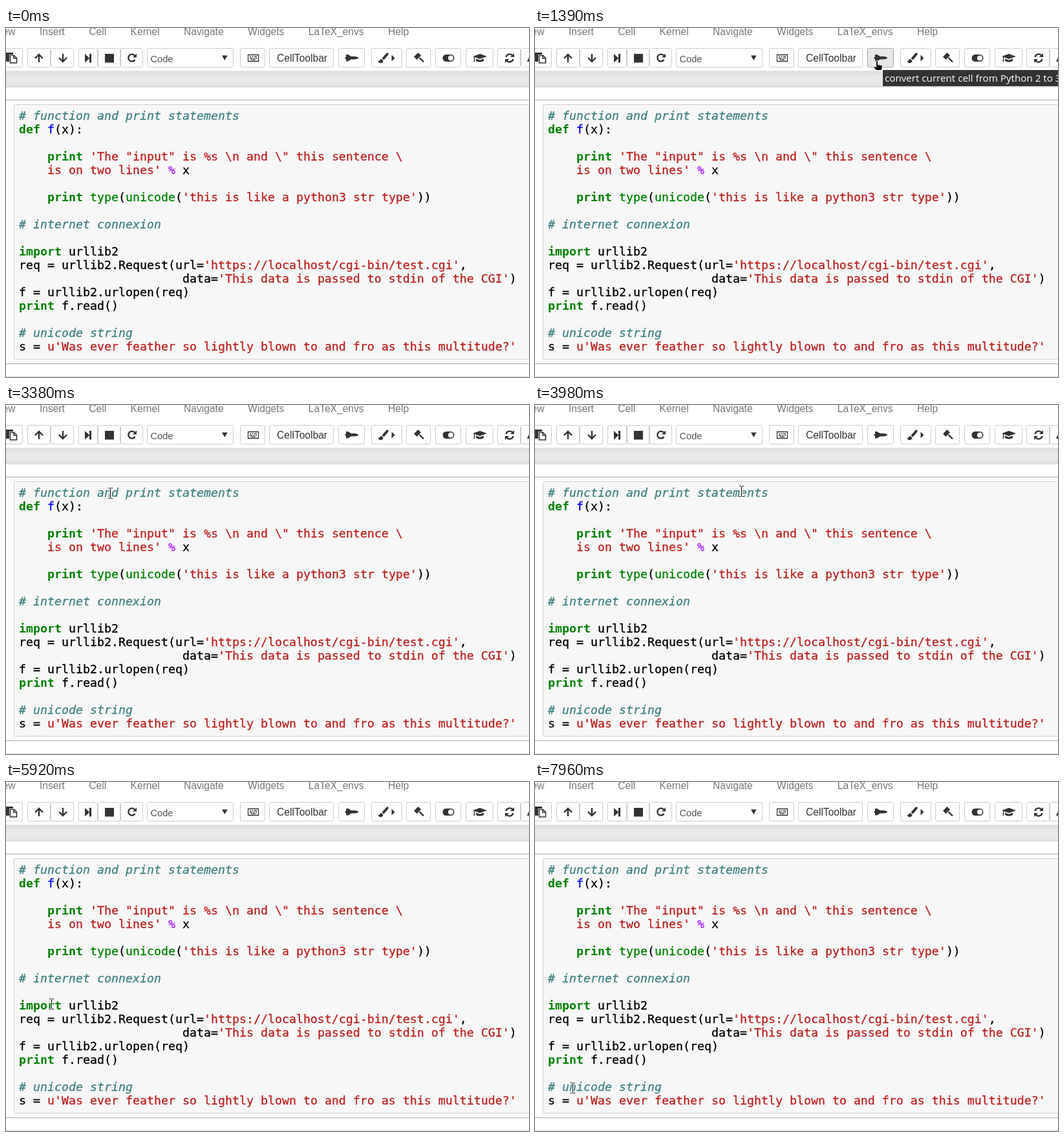
An HTML page that plays this animation: 809 by 540 pixels, repeating every 8 s.

```html
<!DOCTYPE html>
<html lang="en">
<head>
<meta charset="utf-8">
<title>Notebook toolbar</title>
<style>
html, body { margin: 0; width: 100%; height: 100%; overflow: hidden; background: #eee; }
#stage { position: relative; width: 809px; height: 540px; overflow: hidden; background: #eee; }
#stage > * { position: absolute; box-sizing: border-box; }
#page, #header { left: -30px; width: 900px; background: #fff; box-shadow: 0 0 14px 1px rgba(87,87,87,.2); }
#page { top: 92px; height: 500px; }
#header { top: -40px; height: 107px; border-bottom: 1px solid #e7e7e7; }
#cell { left: -9px; top: 111px; width: 900px; height: 409px; border: 1px solid #ababab; }
#rule { left: 0; top: 539px; width: 809px; height: 1px; background: #ddd; }
#code { left: 12px; top: 118px; width: 860px; height: 395px; margin: 0; padding: 6px 7px; border: 1px solid #cfcfcf;
  border-radius: 2px; background: #f7f7f7; color: #000; font: 18.27px/21px "DejaVu Sans Mono", monospace;
  -webkit-text-stroke: .3px; }
#code i { color: #408080; }
#code b { color: #008000; -webkit-text-stroke: 0; }
#code s { color: #ba2121; text-decoration: none; }
#code u { color: #008000; text-decoration: none; }
#code em { color: #00f; font-style: normal; }
#code q { color: #a2f; quotes: none; }
svg { left: 0; top: 0; }
svg text { font: 15.6px "Liberation Sans", sans-serif; fill: #333; }
#menu text { fill: #777; }
#menu text.hover { fill: #333; }
#toolbar rect { fill: #fff; stroke: #ccc; }
#toolbar rect.hover { fill: #e6e6e6; stroke: #adadad; }
#toolbar .shape { fill: #333; fill-rule: evenodd; }
#toolbar .line { fill: none; stroke: #333; }
#toolbar .label { text-anchor: middle; }
#toolbar .choice { font-size: 14.6px; fill: #555; }
#tip text { font: 15.2px "Open Sans", sans-serif; fill: #fff; }
#beam { fill: none; }
</style>
</head>
<body>
<div id="stage">
<div id="page"></div>
<div id="header"></div>
<div id="cell"></div>
<div id="rule"></div>
<pre id="code"><i># function and print statements</i>
<b>def</b> <em>f</em>(x):

    <b>print</b> <s>'The "input" is %s \n and \" this sentence \</s>
    <s>is on two lines'</s> <q>%</q> x

    <b>print</b> <u>type</u>(<u>unicode</u>(<s>'this is like a python3 str type'</s>))

<i># internet connexion</i>

<b>import</b> urllib2
req = urllib2.Request(url=<s>'https://localhost/cgi-bin/test.cgi'</s>,
                       data=<s>'This data is passed to stdin of the CGI'</s>)
f = urllib2.urlopen(req)
<b>print</b> f.read()

<i># unicode string</i>
s = <s>u'Was ever feather so lightly blown to and fro as this multitude?'</s></pre>
<svg width="809" height="540">
  <defs><path id="bar" d="M-3.5-8H-1L0-7 1-8H3.5M0-7V7M-3.5 8H-1L0 7 1 8H3.5"/></defs>
  <g id="menu"></g>
  <g id="toolbar"></g>
  <g id="tip">
    <rect x="538" y="65" width="290" height="25" fill="#333"/>
    <text x="541" y="83">convert current cell from Python 2 to 3</text>
  </g>
  <g id="cursor" stroke-linejoin="round">
    <path id="hand" stroke="#fff" d="M-1.5 1a1.5 1.5 0 0 1 3 0V5.5l5.5 1q1.300.3 1.300 1.5V11l-1.5 3.5H-1.5L-5 9.5q0-2 2-1l1.5 1Z"/>
    <path id="arrow" stroke="#fff" d="M0 0V16l4-3.5 2.5 6 2.5-1-2.5-6H12Z"/>
    <g id="beam" transform="translate(.5 .5)">
      <use href="#bar" stroke="#fff" stroke-width="3"/>
      <use href="#bar" stroke="#000"/>
    </g>
  </g>
</svg>
</div>
<script>
const LOOP = 8000;
const $ = id => document.getElementById(id);

function add(parent, tag, attrs, text = '') {
  const el = document.createElementNS('http://www.w3.org/2000/svg', tag);
  for (const name in attrs) el.setAttribute(name, attrs[name]);
  el.textContent = text;
  $(parent).append(el);
  return el;
}

// Hover targets: element plus the box that reacts to the pointer.
const targets = [];

function layMenu(x, gap) {
  for (const label of ['View', 'Insert', 'Cell', 'Kernel', 'Navigate', 'Widgets', 'LaTeX_envs', 'Help']) {
    const el = add('menu', 'text', { x, y: 11 }, label);
    const width = el.getComputedTextLength();
    targets.push({ el, x: x - gap / 2, y: 0, w: width + gap, h: 23 });
    x += width + gap;
  }
}

// Icons are drawn around the middle of their button; w is the icon width.
const icons = {
  paste: { w: 14, shape: 'M-9-8H2V-5H-4V6H-9Z', line: 'M-2.5-3.5h6l4 4V8H-2.5ZM3-3.5V1H7.5', pen: 1.6 },
  up: { w: 14, line: 'M0 7V-5M-6 1l6-6 6 6' },
  down: { w: 14, line: 'M0-6V6M-6 0l6 6 6-6' },
  step: { w: 8, shape: 'M-5-6l7 6.500V-6h3V7.500H2V1l-7 6.500Z' },
  stop: { w: 13, shape: 'M-7-6H7V7.500H-7Z' },
  repeat: { w: 13, shape: 'M7-6.500v6H1Z', line: 'M4.500 3A5.500 5.500 0 1 1 4-3.500' },
  select: { w: 114 },
  keyboard: { w: 17, line: 'M-7.500-4.500h16v10h-16ZM-5-1.500h2m1.500 0h2m1.500 0h4M-5 1h4m1.500 0h2m1.500 0h2M-3 3.200h7', pen: 1.3 },
  cellbar: { w: 78, label: 'CellToolbar' },
  shuttle: { w: 19, shape: 'M-9-5h3l5 3h6q5 .8 5 2.300t-5 2.300h-6l-5 3h-3v-4h-1.500v-2.600h1.500Z' },
  brush: { w: 26, space: 3.5, shape: 'M2-7.500q1.500 1-.5 4l-6 7-3-2.500 6-7q2.500-2.500 3.500-1.500ZM-8.500 2l3 2.500q-.5 3.800-4 3.800-3 0-4-3.500 2 .7 2.500-.8.8-2 2.500-2ZM7.500-4.500l5 5-5 5Z' },
  gavel: { w: 16, shape: 'M-8-1.500l6.500-6.500 4.500 4.500-6.500 6.500Z', line: 'M.5 0l6.500 6.500' },
  toggle: { w: 18, shape: 'M-4-5H3A5.500 5.500 0 0 1 3 6H-4A5.500 5.500 0 0 1-4-5ZM-1 .5a4 4 0 1 0 8 0a4 4 0 1 0-8 0Z' },
  cap: { w: 21, shape: 'M0-6l11 4-11 4-11-4ZM-6 1.500l6 2.300 6-2.300v3.500q-6 3.500-12 0ZM-9-1h1.200v7h-1.700Z' },
  refresh: { w: 14, shape: 'M7-7v6H1ZM-7 8V2h6Z', line: 'M-5.500-1a5.700 5.700 0 0 1 10-2.500M5.500 2a5.700 5.700 0 0 1-10 2.500' },
  peak: { w: 18, shape: 'M-11 6l4-9v9Z' }
};
const groups = 'paste|up down|step stop repeat|select|keyboard|cellbar|shuttle|brush|gavel|toggle|cap|refresh peak';

function layToolbar(x, padding, gap) {
  for (const group of groups.split('|')) {
    for (const name of group.split(' ')) {
      const { w, shape, line, label, pen = 2.4, space = 0 } = icons[name];
      x += space;
      const width = w + padding, middle = Math.round(x + width / 2);
      if (name === 'select') {
        add('toolbar', 'rect', { x: 218.5, y: 31.5, width: 133, height: 29, rx: 2 });
        add('toolbar', 'text', { class: 'choice', x: 223.5, y: 53 }, 'Code');
        add('toolbar', 'path', { class: 'shape', d: 'M334 42.5h8.500l-4.200 7.500Z' });
      } else {
        const el = add('toolbar', 'rect', { x: Math.floor(x) + .5, y: 31.5, width: Math.round(width) - 1, height: 29, rx: 2 });
        targets.push({ el, x, y: 31, w: width, h: 30 });
        const transform = `translate(${middle} 46)`;
        if (shape) add('toolbar', 'path', { class: 'shape', d: shape, transform });
        if (line) add('toolbar', 'path', { class: 'line', d: line, transform, 'stroke-width': pen });
        if (label) add('toolbar', 'text', { class: 'label', x: middle, y: 52 }, label);
      }
      x += width;
    }
    x += gap;
  }
}

layMenu(-19, 37.4);
layToolbar(-9.3, 22.3, 6.3);

// Pointer stops: time, x, y
const path = [
  [40, 627, -18], [600, 545, 25], [850, 529, 51], [2340, 529, 51], [2980, 96, 152], [3380, 161, 136],
  [4020, 320, 133], [4560, 233, 284], [4760, 233, 284], [4960, 248, 298], [5460, 41, 313], [5920, 70, 343],
  [6560, 168, 348], [6920, 55, 428], [7120, 55, 429], [7520, 21, 475], [7960, 58, 473]
];
const last = path.length - 1;

const slope = (i, axis) => (path[i + 1][axis] - path[i][axis]) / (path[i + 1][0] - path[i][0]);

// Tangent that never overshoots: zero at turns, pauses and ends.
function tangent(i, axis) {
  if (i === 0 || i === last) return 0;
  const a = slope(i - 1, axis), b = slope(i, axis);
  return a * b > 0 ? 2 * a * b / (a + b) : 0;
}

function position(time, axis) {
  const t = Math.min(Math.max(time, path[0][0]), path[last][0]);
  const i = Math.max(0, path.findIndex(p => p[0] >= t) - 1);
  const span = path[i + 1][0] - path[i][0], u = (t - path[i][0]) / span, v = 1 - u;
  return Math.round(v * v * (1 + 2 * u) * path[i][axis] + u * u * (3 - 2 * u) * path[i + 1][axis]
    + span * u * v * (v * tangent(i, axis) - u * tangent(i + 1, axis)));
}

const show = (id, on) => $(id).style.display = on ? '' : 'none';

function draw(now) {
  const t = now % LOOP;
  const x = position(t, 1), y = position(t, 2);
  let linked = false;
  for (const b of targets) {
    const over = x >= b.x && x < b.x + b.w && y >= b.y && y < b.y + b.h;
    b.el.classList.toggle('hover', over);
    linked = linked || over;
  }
  const typing = y > 118;
  show('hand', linked);
  show('beam', typing);
  show('arrow', !linked && !typing);
  show('tip', t >= 1390 && t < 2380);
  $('cursor').setAttribute('transform', `translate(${x} ${y})`);
  requestAnimationFrame(draw);
}
draw(0);
</script>
</body>
</html>
```
